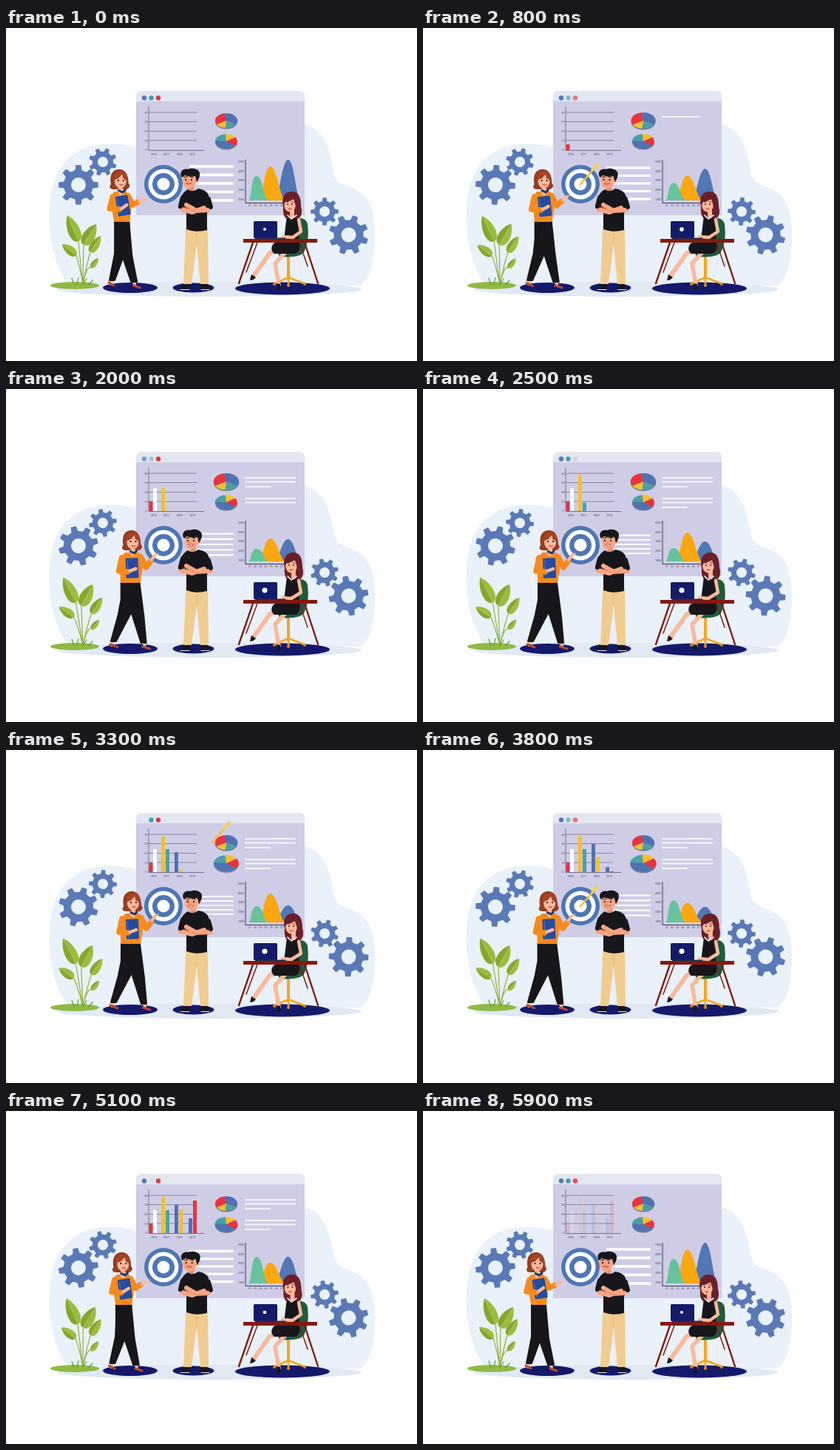
An HTML page for the animation above (6000 ms loop, 556x450 px).

```html
<!DOCTYPE html>
<html lang="en">
<head>
<meta charset="utf-8">
<title>Team dashboard</title>
<style>
  html, body { margin: 0; width: 100%; height: 100%; overflow: hidden; background: #fff; }
  svg { display: block; width: 556px; height: 450px; }
  text { font-family: Roboto, Arial, sans-serif; font-size: 3.6px; fill: #4b4a66; text-anchor: middle; }
  .round { fill: none; stroke-linecap: round; stroke-linejoin: round; }
</style>
</head>
<body>
<svg viewBox="0 0 556 450">
  <path fill="#e9f1fa" d="M84 347C64 318 56 276 59 242C61 205 74 178 103 164C133 151 168 157 185 165L395 128C428 132 438 160 443 194C446 216 468 211 484 226C500 242 501 280 497 309C494 330 488 342 480 348Z"/>
  <ellipse cx="275" cy="353" rx="206" ry="10" fill="#e1e9f3"/>
  <g fill="#14196b">
    <ellipse cx="168" cy="351" rx="37" ry="7"/>
    <ellipse cx="253.500" cy="351" rx="28" ry="6.500"/>
    <ellipse cx="374" cy="352" rx="64" ry="8.500"/>
  </g>
  <ellipse cx="93" cy="348" rx="33" ry="5" fill="#8fba45"/>
  <g id="plant"></g>
  <g id="gears" fill="#5b79b6" fill-rule="evenodd"></g>

  <path fill="#cfcde6" d="M176 99H404V253H176Z"/>
  <path fill="#e2e7f1" d="M176 99V92Q176 85 183 85H397Q404 85 404 92V99Z"/>
  <g id="dots"></g>
  <path fill="none" stroke="#77759a" stroke-width=".8" d="M193 114H258M193 126.500H258M193 139.500H258M193 152H258"/>
  <path fill="none" stroke="#5d5b78" stroke-width=".8" d="M193 106V165.500H268"/>
  <g id="bars"></g>
  <g id="pies"></g>
  <g id="notes" class="round" stroke="#f3f3fb" stroke-width="2.200"></g>
  <g id="rows" fill="#fff"></g>
  <g id="hills"></g>
  <path fill="none" stroke="#3a3950" d="M324 178V236.500H392"/>
  <g id="labels"></g>
  <g>
    <circle cx="213" cy="211" r="26" fill="#4f76b3"/>
    <circle cx="213" cy="211" r="20.500" fill="#fff"/>
    <circle cx="213" cy="211" r="15" fill="#4f76b3"/>
    <circle cx="213" cy="211" r="8.500" fill="#fff"/>
  </g>
  <g id="dart">
    <path class="round" stroke="#f5c02c" stroke-width="2.400" d="M213 211L236 185"/>
    <path class="round" stroke="#f8cf4a" stroke-width="3.800" d="M229 192L236 184.500"/>
  </g>
  <g id="presenter"></g>
  <g id="man"></g>

  <g class="round" stroke="#f5a81f">
    <path stroke-width="4" d="M382 308V338"/>
    <path stroke-width="2.600" d="M382 337L364 345M382 337L403 345M382 337V347"/>
  </g>
  <g fill="#d98e14">
    <circle cx="363" cy="346" r="2"/><circle cx="382" cy="348" r="2"/><circle cx="404" cy="346" r="2"/>
  </g>
  <path fill="#1f5a3c" d="M391 258Q405 254 408 265Q411 288 403 303Q397 311 370 309L368 304L390 300Z"/>
  <g id="sitter"></g>
  <g class="round" stroke="#7d1d14">
    <path stroke-width="2.400" d="M334 290L315 345M404 290L422 345"/>
    <path stroke-width="1.500" d="M340 290L325 330M397 290L408 322"/>
  </g>
  <path fill="#84190f" d="M321 285H421V290H321Z"/>
  <rect x="335" y="261" width="32" height="23" rx="1.500" fill="#141b68"/>
  <path fill="#262b55" d="M337 283.500H378V285.500H337Z"/>
  <circle id="lamp" cx="350" cy="272" fill="#fff"/>
</svg>

<script>
const LOOP = 6000, STEP = 100;
const $ = id => document.getElementById(id);
const clamp = v => Math.max(0, Math.min(1, v));
const ramp = (t, from, to) => clamp((t - from) / (to - from));
const mix = (a, b, k) => a + (b - a) * k;
const n = v => v.toFixed(2);

// Eased interpolation through [time, value] pairs.
function track(t, keys) {
  const i = keys.findIndex(k => k[0] > t);
  if (i < 1) return keys[i < 0 ? keys.length - 1 : 0][1];
  const [t0, a] = keys[i - 1], [t1, b] = keys[i];
  return mix(a, b, (1 - Math.cos(Math.PI * (t - t0) / (t1 - t0))) / 2);
}

const path = (d, fill, extra = '') => `<path d="${d}" fill="${fill}" ${extra}/>`;
const line = (d, color, w) => `<path class="round" d="${d}" stroke="${color}" stroke-width="${w}"/>`;
const oval = (x, y, rx, ry, fill) =>
  `<ellipse cx="${n(x)}" cy="${n(y)}" rx="${rx}" ry="${ry}" fill="${fill}"/>`;
const group = (x, y, inner, turn = 0) =>
  `<g transform="translate(${n(x)} ${n(y)}) rotate(${n(turn)})">${inner}</g>`;

// Limb between two poses; joints are [x, y, x', y'].
const limb = (k, color, w, joints) =>
  line('M' + joints.map(j => n(mix(j[0], j[2], k)) + ' ' + n(mix(j[1], j[3], k))).join('L'), color, w);

// Body part from horizontal slices [y, left, right, left', right'].
function body(k, fill, slices) {
  const left = slices.map(s => n(mix(s[1], s[3], k)) + ' ' + s[0]);
  const right = slices.map(s => n(mix(s[2], s[4], k)) + ' ' + s[0]).reverse();
  return path('M' + left.concat(right).join('L') + 'Z', fill,
    `stroke="${fill}" stroke-width="2" stroke-linejoin="round"`);
}

function gear(r) {
  const teeth = 8, pts = [];
  for (let i = 0; i < teeth; i++) {
    for (const [off, k] of [[-.29, .75], [-.17, 1], [.17, 1], [.29, .75]]) {
      const a = (i + off) / teeth * 2 * Math.PI;
      pts.push(n(r * k * Math.cos(a)) + ' ' + n(r * k * Math.sin(a)));
    }
  }
  const h = r * .37;
  return `<path d="M${pts.join('L')}ZM${h} 0A${h} ${h} 0 1 0 ${-h} 0A${h} ${h} 0 1 0 ${h} 0Z"/>`;
}

const GEARS = [[98, 212, 27, 1], [131, 181, 19, -1], [431, 248, 19, 1], [463.5, 279.5, 27, -1]];
const drawGears = t => GEARS.map(([x, y, r, dir]) =>
  group(x, y, gear(r), dir * 360 * t / LOOP + (dir < 0 ? 20 : 0))).join('');

const DOTS = [[187, '#5478b6', 300, 300], [196.5, '#3f9fb0', 620, 300], [206, '#e9343f', 1050, 400]];
const drawDots = t => DOTS.map(([x, color, mid, w]) =>
  `<circle cx="${x}" cy="94.500" r="3.200" fill="${color}" opacity="${n(clamp(Math.abs(t % 1500 - mid) / w))}"/>`).join('');

const RED = '#e8333f', GOLD = '#f6bf2f', TEAL = '#4ba0a8', BLUE = '#4f72b2';
const BARS = [
  [193.5, 13, RED, 230], [199, 31, '#fff', 830], [210, 49, GOLD, 1400], [216, 31, TEAL, 2150],
  [228, 38, BLUE, 2630], [234, 32, GOLD, 3200], [247, 20, BLUE, 3480], [253, 44, RED, 3780]
];
function drawBars(t) {
  const rects = BARS.map(([x, h, color, start]) => {
    const now = h * ramp(t, start, start + 950);
    return `<rect x="${x}" y="${n(165 - now)}" width="5" height="${n(now)}" fill="${color}"/>`;
  });
  return `<g opacity="${n(1 - ramp(t, 5300, 6000))}">${rects.join('')}</g>`;
}

function pie(y, scale, slices) {
  const rx = 15 * scale, ry = 9.8 * scale;
  const at = deg => {
    const a = deg * Math.PI / 180;
    return n(298 + rx * Math.cos(a)) + ' ' + n(y + ry * Math.sin(a));
  };
  return oval(298, y + 1.8, n(rx), n(ry), '#77809c') + slices.map(([from, to, color]) =>
    path(`M298 ${y}L${at(from)}A${n(rx)} ${n(ry)} 0 0 1 ${at(to)}Z`, color)).join('');
}
function drawPies(t) {
  const first = track(t, [[0, 1], [1300, 1.15], [2600, 1.15], [3500, 1]]);
  const second = track(t, [[2500, 1], [3300, 1.13], [4200, 1.2], [5400, 1]]);
  return pie(125, first, [[-100, 30, BLUE], [30, 95, TEAL], [95, 150, GOLD], [150, 260, RED]]) +
    pie(153, second, [[-35, 40, RED], [40, 185, BLUE], [185, 265, TEAL], [265, 325, GOLD]]);
}

const NOTES = [[120, 69, 600], [125.5, 69, 870], [132, 35, 1140], [148, 69, 1470], [153.5, 69, 1730], [160, 35, 2000]];
const drawNotes = t => NOTES.map(([y, w, start]) => {
  const k = ramp(t, start, start + 270);
  return k ? `<path d="M324 ${y}h${n((w - 2) * k)}"/>` : '';
}).join('');

function drawRows(t) {
  const k = .75 + .25 * Math.cos(2 * Math.PI * t / LOOP);
  return [-2, -1, 0, 1, 2].map(i =>
    `<rect x="248" y="${n(210 + i * 11.5 * k - 1.7 * k)}" width="60" height="${n(3.4 * k)}" rx="1"/>`).join('');
}

const HILLS = [
  ['#5376b5', 365, 381.5, 399, [[0, 55], [1500, 33], [2500, 27], [3300, 23], [4300, 19], [5100, 36], [5900, 55]]],
  ['#fba70f', 343, 357.5, 378, [[0, 46], [1500, 23], [2500, 39], [3300, 39], [4300, 14], [5100, 28], [5900, 46]]],
  ['#67c39b', 328.5, 339, 355, [[0, 33], [1500, 16], [2500, 18], [3300, 22], [4300, 38], [5100, 36], [5900, 33]]]
];
const drawHills = t => HILLS.map(([color, l, c, r, keys]) => {
  const top = n(233 - track(t, keys));
  return path(`M${l} 233C${l + 4} 230 ${c - 8} ${top} ${c} ${top}C${c + 9} ${top} ${r - 7} 231 ${r} 233Z`, color);
}).join('');

function leaf(x, y, tx, ty, w) {
  const dx = tx - x, dy = ty - y, len = Math.hypot(dx, dy);
  const side = s => `C${n(x - dy / len * w * s)} ${n(y + dx / len * w * s)} ` +
    `${n(tx - dy / len * w * s - dx * .35)} ${n(ty + dx / len * w * s - dy * .35)} ${tx} ${ty}`;
  return line(`M${x} ${y}Q${mix(x, 104, .5)} 320 104 346`, '#88ab35', 1.1) +
    path(`M${x} ${y}${side(1)}Z`, '#9abd3c') + path(`M${x} ${y}${side(-1)}Z`, '#84a72e') +
    line(`M${x} ${y}L${n(mix(x, tx, .85))} ${n(mix(y, ty, .85))}`, '#b4cf66', .6);
}
const sway = (deg, inner) => `<g transform="rotate(${n(deg)} 104 346)">${inner}</g>`;
const drawPlant = k =>
  sway(-3.5 * k, leaf(98, 288, 83, 253, 11) + leaf(105, 293, 122, 265, 11)) +
  sway(-5 * k, leaf(95, 307, 76, 292, 8)) +
  sway(2 * k, leaf(114, 303, 128, 281, 8) + leaf(115, 324, 125, 311, 5)) +
  line('M92 347L89 338M96 347L98 337M104 347L109 339M112 347L117 341', '#6c9a32', 1.2);

const SKIN = '#fcb99a', INK = '#17161b';

function drawPresenter(k) {
  const sweater = '#f68a1e', folder = '#254a9f';
  const head =
    path('M-2 -15C9 -16 12 -5 12 4Q16 8 10 12H-9Q-16 11 -12 5C-14 -8 -10 -14 -2 -15Z', '#963d20') +
    line('M1 8V17', SKIN, 6) + oval(1, 1, 8, 9.5, SKIN) +
    path('M-9 0Q-8 -12 1 -13Q11 -11 10 1Q5 -2 3 -8Q-2 -2 -9 0Z', '#a74424') +
    oval(-2, 0, 1, 1.2, INK) + oval(5, 0, 1, 1.2, INK) +
    line('M-4 -3.500L-1 -4M4 -4L7 -3.500', '#6d2814', .8) +
    line('M0 5.500Q2 7.500 4.500 5.500', '#d43b38', 1.1);
  return limb(k, SKIN, 4, [[144, 341, 145, 342], [142, 346, 143, 346]]) +
    limb(k, SKIN, 4, [[173, 343, 187, 342], [174, 348, 188, 347]]) +
    limb(k, '#b54a2c', 3, [[139, 344, 141, 345], [146, 348, 151, 349]]) +
    limb(k, '#b54a2c', 3, [[172, 348, 185, 348], [181, 351, 195, 351]]) +
    body(k, INK, [[262, 147, 166, 156, 181], [285, 147, 166, 156, 179], [305, 147, 160, 152, 168], [341, 140, 147, 142, 149]]) +
    body(k, INK, [[262, 147, 166, 156, 181], [285, 151, 168, 164, 184], [308, 157, 170, 172, 187], [343, 169, 177, 183, 190]]) +
    body(k, sweater, [[222, 147, 162, 162, 180], [228, 142, 167, 156, 185], [245, 144, 168, 156, 184], [261, 147, 166, 156, 181]]) +
    limb(k, sweater, 7.5, [[165, 227, 183, 227], [171, 239, 190, 241], [178, 235.5, 196, 233]]) +
    limb(k, SKIN, 4, [[180, 235, 197, 231], [187, 232, 202, 224]]) +
    limb(k, SKIN, 1.6, [[186, 232, 201, 225], [191, 230, 206, 222]]) +
    group(mix(158, 171, k), mix(240, 242, k),
      `<rect x="-8.500" y="-13.500" width="17" height="27" rx="1" fill="${folder}"/>` +
      line('M-6 -11V11', '#4d70bd', 1), mix(-10, -2, k)) +
    limb(k, sweater, 7.5, [[144, 228, 157, 228], [140, 244, 153, 246], [153, 245, 165, 247]]) +
    limb(k, SKIN, 4.5, [[156, 244, 168, 246], [163, 239, 176, 243]]) +
    group(mix(153.5, 171, k), 206, head) +
    limb(k, '#27336d', 3, [[152, 219.5, 169, 219.5], [157, 222, 174, 222], [161, 219, 177, 219]]);
}

function drawMan(k) {
  const tan = '#f1cc91', skin = '#f7a583';
  const smile = mix(5.2, 8.5, k);
  const head =
    line('M2 8V16', '#e58f6d', 8) + oval(0, 1, 9.3, 11, skin) + oval(10, 1, 2, 3, skin) +
    path('M-10 -3C-15 -10 -8 -16 -2 -14C4 -17 15 -14 14 -7C14 -3 12 0 10 3L8 -5Q0 -3 -6 -6Z', INK) +
    oval(-5, 0, 1, 1.2, INK) + oval(3, 0, 1, 1.2, INK) +
    line('M-7 -3.500L-3 -4M1 -4L5 -3.500', INK, 1.1) + line('M-1.500 1L-2.500 4H-1', '#d9805f', .8) +
    path(`M-4.500 5Q-1 ${n(smile + 2)} 3 5Q-1 ${n(mix(6, 5.4, k))} -4.500 5Z`, '#fff', 'stroke="#b9392f" stroke-width=".8"');
  return path('M235 353Q235 348 243 346H249V353Z', INK) +
    path('M263 346H272Q277 350 275 353H263Z', INK) +
    line('M236 353.500H248M264 353.500H275', '#fff', .9) +
    path('M243 270H273L274 346H263L258 292L251 346H240Q242 305 243 270Z', tan) +
    line('M258 278V292', '#d9b277', .8) +
    group(mix(248, 251, k), 205, head) +
    path('M246 218Q252 223 260 217Q272 219 274 226L278 243L272 250V273Q258 277 244 272V250L233 243Q235 224 246 218Z', INK) +
    line(`M${n(mix(238, 236, k))} 245L252 249L268 243`, skin, 6) +
    line(`M${n(mix(273, 277, k))} 246L258 247L244 239`, skin, 6) +
    line('M241 242L256 248L268 249', '#d98664', .7) +
    line('M239 229L236 241M274 231L277 242', INK, 6);
}

function drawSitter(k) {
  const hair = '#6a2028';
  const x = mix(386, 388, k);
  const head =
    path('M-1 -16C11 -17 13 -6 13 4Q16 16 10 20H-7Q-12 17 -11 5C-14 -9 -9 -15 -1 -16Z', hair) +
    line('M1 8V17', SKIN, 6) + oval(-2, 2, 7.8, 9.5, SKIN) +
    path('M-11 3Q-10 -12 0 -14Q11 -10 8 8Q5 2 3 -6Q-3 -2 -8 -2Z', hair) +
    oval(-5, 1, .9, 1.1, INK) + oval(1, 1, .9, 1.1, INK) +
    line('M-7 -2H-4M0 -2H3', '#4f151b', .8) + line('M-4 7Q-2 8.500 0 7', '#cf3940', 1.1);
  return line('M378 303L364 318L369 347', SKIN, 5.5) +
    path('M366 345L371 346L371 354L367 354Z', INK) +
    line('M380 299L357 304L335 335', SKIN, 6) +
    path('M332 333L338 337Q335 341 330 341Z', INK) +
    path('M380 253Q392 249 397 256L396 282Q401 302 391 305L363 305Q356 299 362 291L376 286Z', INK) +
    group(x, 237, head) +
    line('M381 253L386 258L393 253', '#f1f1f3', 1.6) +
    line(`M396 259L399 275L${n(mix(388, 386, k))} 283L374 282`, SKIN, 4.5);
}

function drawLabels() {
  const put = (x, y, s) => `<text x="${x}" y="${y}">${s}</text>`;
  const years = [2016, 2017, 2018, 2019].map((s, i) => put(200 + i * 17.4, 172, s));
  const counts = [40, 30, 20, 10, 0].map((s, i) => put(189.5, 115.5 + i * 12.7, s));
  const sums = [5, 4, 3, 2, 1].map((s, i) => put(318, 182 + i * 12.7, s * 1000));
  const months = Array.from({ length: 8 }, (_, i) => put(330 + i * 7.2, 241, '0' + (i + 1)));
  return [...years, ...counts, ...sums, ...months].join('');
}

function drawDart(t) {
  const u = t % 3000, away = 1 - ramp(u, 200, 600);
  $('dart').setAttribute('transform', `translate(${n(88 * away)} ${n(-115 * away)})`);
  $('dart').setAttribute('opacity', n(ramp(u, 150, 280) * (1 - ramp(u, 1700, 2000))));
}

function render(t) {
  const lean = track(t, [[0, .02], [700, .5], [1500, .94], [2500, 1], [3300, 1], [4300, .9], [5100, .22], [5900, 0]]);
  $('plant').innerHTML = drawPlant(lean);
  $('gears').innerHTML = drawGears(t);
  $('dots').innerHTML = drawDots(t);
  $('bars').innerHTML = drawBars(t);
  $('pies').innerHTML = drawPies(t);
  $('notes').innerHTML = drawNotes(t);
  $('notes').setAttribute('opacity', n(1 - ramp(t, 5300, 5800)));
  $('rows').innerHTML = drawRows(t);
  $('hills').innerHTML = drawHills(t);
  drawDart(t);
  $('presenter').innerHTML = drawPresenter(lean);
  $('man').innerHTML = drawMan(lean);
  $('sitter').innerHTML = drawSitter(lean);
  $('lamp').setAttribute('r', n(mix(2, 3.6, lean)));
}

$('labels').innerHTML = drawLabels();
const begin = performance.now();
let shown = -1;
function tick() {
  const t = Math.floor((performance.now() - begin) % LOOP / STEP) * STEP;
  if (t !== shown) render(shown = t);
  requestAnimationFrame(tick);
}
tick();
</script>
</body>
</html>
```
